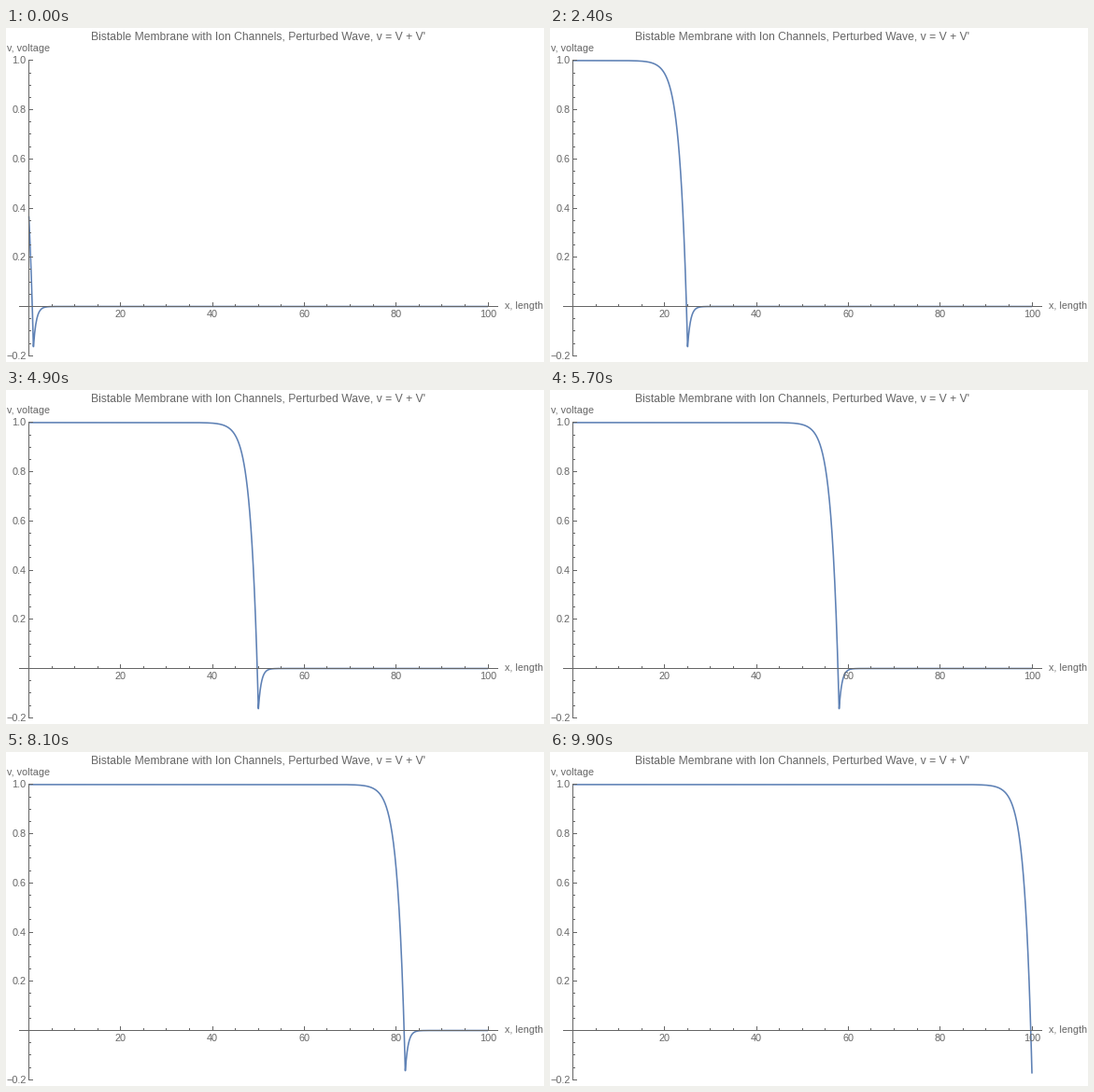
Animation, 576 px wide and 358 px high, one loop 10 s. Source, as a matplotlib script:

```python
import numpy as np
import matplotlib.pyplot as plt
from matplotlib.animation import FuncAnimation

W, H, DPI = 576, 358, 64
PX = 72 / DPI                      # points per pixel
X0, Y0 = 24.5, 298.5               # pixel position of the origin
SX, SY = 4.915, 263.6              # pixels per unit
GRAY, BLUE = "#666666", "#5e81b5"
FRAMES, LENGTH = 100, 100
RISE, DECAY = (np.sqrt(5) - 1) / 2, (np.sqrt(5) + 1) / 2

plt.rcParams["font.family"] = "Liberation Sans"
plt.rcParams["lines.solid_capstyle"] = "butt"

fig = plt.figure(figsize=(W / DPI, H / DPI), dpi=DPI, facecolor="white")
ax = fig.add_axes([0, 0, 1, 1])
ax.set_xlim(0, W)
ax.set_ylim(H, 0)
ax.axis("off")


def px(x):
    return X0 + SX * x


def py(v):
    return Y0 - SY * v


def center(p):
    return np.floor(p) + 0.5


def stroke(xs, ys):
    ax.plot(xs, ys, color=GRAY, lw=PX, snap=False, zorder=3)


def label(x, y, text, size=10.9, ha="left"):
    ax.text(x, y, text, size=size * PX, color=GRAY, ha=ha, va="baseline",
            zorder=4)


def draw_axes():
    stroke([14, 527], [Y0, Y0])
    stroke([X0, X0], [34, 352])
    for x in range(5, LENGTH + 1, 5):
        major = x % 20 == 0
        p = center(px(x))
        stroke([p, p], [Y0, 294 if major else 296])
        if major:
            label(p - 0.3, 310.5, str(x), ha="center")
    for k in range(-4, 21):
        if k == 0:
            continue
        major = k % 4 == 0
        p = center(py(k / 20))
        stroke([X0, 29 if major else 27], [p, p])
        if major:
            label(21.4, p + 3.5, f"{k / 20:.1f}".replace("-", "\u2212"),
                  ha="right")
    label(91, 12, "Bistable Membrane with Ion Channels, "
          "Perturbed Wave, v = V + V'", 12.14)
    label(1, 25, "v, voltage", 10.8)
    label(533.5, 301, "x, length", 10.8)


def wave(front):
    """Voltage profile with its cusp at the given front position."""
    end = front if front >= LENGTH else front - 0.016
    back = np.linspace(0, end, 800)
    ahead = np.linspace(front, LENGTH, 800)[: 800 if front < LENGTH else 0]
    v_back = 1 - 1.175 * np.exp(RISE * (back - front))
    v_ahead = -0.163 * np.exp(-DECAY * (ahead - front))
    return np.r_[back, ahead], np.r_[v_back, v_ahead]


draw_axes()
curve, = ax.plot([], [], color=BLUE, lw=1.6 * PX, snap=False, zorder=2)


def update(i):
    x, v = wave(i + 1)
    curve.set_data(px(x), py(v))
    return curve,


anim = FuncAnimation(fig, update, frames=FRAMES, interval=100, repeat=True,
                     repeat_delay=0)
plt.show()
```
